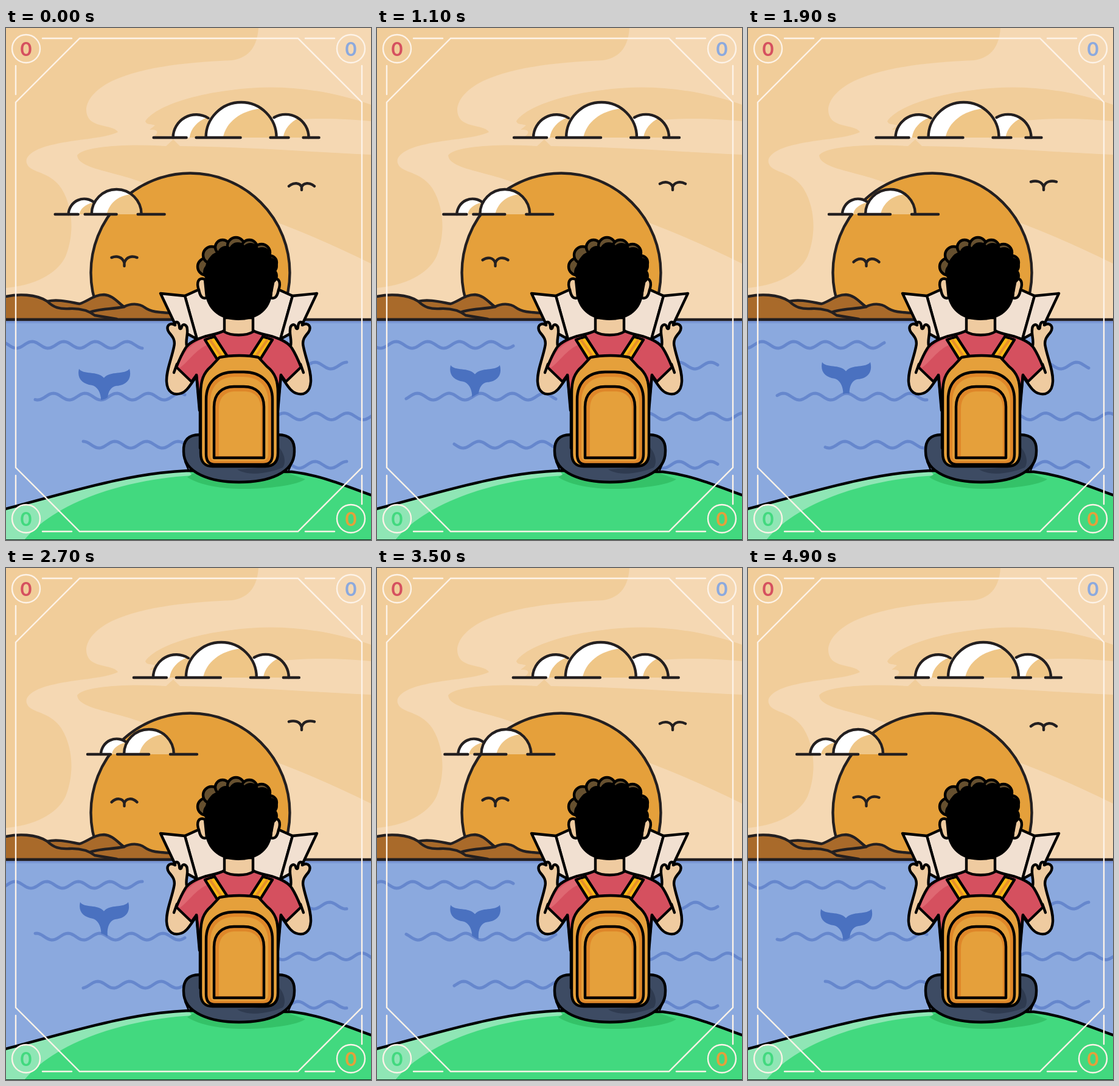
Animation, 600 px wide and 841 px high, one loop 5 s. Source, as an HTML page:

```html
<!DOCTYPE html>
<html lang="en">
<head>
<meta charset="utf-8">
<title>Sunset by the sea</title>
<style>
html, body { margin: 0; width: 100%; height: 100%; overflow: hidden; }
svg { display: block; width: 100vw; height: 100vh; }
text { font: 600 31px Inter, Roboto, sans-serif; text-anchor: middle; }
.ink { stroke: #231f20; stroke-width: 4.4; stroke-linecap: round; stroke-linejoin: round; }
.pen { stroke: #000; stroke-width: 4.4; stroke-linecap: round; stroke-linejoin: round; }
.no { fill: none; }
.tan { fill: #efc687; }
.skin { fill: #efcba0; }
</style>
</head>
<body>
<svg viewBox="0 0 600 841" preserveAspectRatio="none">
  <defs><clipPath id="above"><path id="cut"/></clipPath></defs>

  <!-- sky -->
  <path fill="#f1cd9a" d="M0 0H600V480H0Z"/>
  <path fill="#f5d8b3" d="M415 0C413 28 402 48 372 53C300 56 215 64 165 92C135 110 124 134 138 151C150 163 178 160 184 171C160 182 112 183 80 191C50 197 30 209 34 222C40 240 72 233 92 265C111 297 112 340 98 375C84 405 45 423 0 427V480H600V0Z"/>
  <g fill="#f1cd9a">
    <path d="M600 126C520 98 440 92 370 102C310 109 246 128 229 153C231 160 240 157 245 160L236 167C250 166 252 172 243 178C320 178 420 148 520 149C550 149 575 151 600 153Z"/>
    <path d="M600 208C500 204 400 195 286 194L275 183L263 194C200 190 128 194 117 209C118 232 180 235 230 256C320 290 390 300 450 321C500 340 550 362 600 387Z"/>
  </g>
  <circle class="ink" cx="303" cy="402" r="163.5" fill="#e5a03b"/>

  <!-- clouds -->
  <g id="cloudA">
    <g fill="#fff">
      <path d="M275 180A38 38 0 0 1 351 180Z"/>
      <path class="tan" d="M302 180C304 165 315 153 331 147L351 180Z"/>
      <path class="ink no" d="M275 180A38 38 0 0 1 333 148"/>
      <path d="M422 180A38 38 0 0 1 498 180Z"/>
      <path class="tan" d="M456 180C458 165 468 155 481 148A38 38 0 0 1 498 180Z"/>
      <path class="ink no" d="M441 147A38 38 0 0 1 498 180"/>
      <path d="M329 180A58 58 0 0 1 445 180Z"/>
      <path class="tan" d="M357 180C362 155 385 136 420 132A58 58 0 0 1 445 180Z"/>
    </g>
    <path class="ink no" d="M329 180A58 58 0 0 1 445 180M243 180H297M313 180H386M435 180H465M489 180H515"/>
  </g>
  <g id="cloudB">
    <g fill="#fff">
      <path d="M102 306A26 26 0 0 1 154 306Z"/>
      <path class="tan" d="M120 306C121 297 129 290 144 286L154 306Z"/>
      <path class="ink no" d="M102 306A26 26 0 0 1 145 287"/>
      <path d="M140 306A41 41 0 0 1 222 306Z"/>
      <path class="tan" d="M165 306C168 290 182 275 206 273A41 41 0 0 1 222 306Z"/>
    </g>
    <path class="ink no" d="M140 306A41 41 0 0 1 222 306M80 306H118M129 306H181M216 306H260"/>
  </g>
  <path id="birdA" class="ink no"/>
  <path id="birdB" class="ink no"/>

  <!-- hills and sea -->
  <g class="ink" fill="#a96a2a">
    <path d="M-5 442C20 436 50 437 68 449C85 445 104 450 121 453C136 448 145 438 161 438C176 439 184 451 194 458C205 452 218 452 228 459C240 468 255 467 290 469V479H-5Z"/>
    <path class="no" d="M68 449C78 459 88 462 104 461C125 460 138 466 146 472M194 458C175 462 150 461 138 467M146 472L182 478"/>
  </g>
  <path fill="#8ba9de" d="M0 479H600V841H0Z"/>
  <path fill="#7b98d6" d="M0 481H600V485H0Z"/>
  <path class="ink" d="M-5 479H605"/>
  <g id="waves" fill="none" stroke="#6687cd" stroke-width="5" stroke-linecap="round"/>
  <g clip-path="url(#above)">
    <path id="tail" fill="#4a71c0" d="M120 560C126 570 151 563 161 575C171 563 196 570 203 560C208 578 196 587 182 588C172 589 168 598 167 608V640H156V608C155 598 150 589 141 587C126 585 116 576 120 560Z"/>
  </g>

  <!-- ground -->
  <path fill="#42d97f" d="M-5 791C100 764 200 731 300 727L470 729C520 735 560 753 605 769V841H-5Z"/>
  <path fill="#8fe6b5" d="M-5 791C100 764 200 731 300 727L306 735C190 742 80 780 30 841H-5Z"/>
  <path fill="#34c268" d="M298 738C320 752 360 758 400 757C440 756 480 750 492 741L460 730H310Z"/>
  <path class="pen no" d="M-5 791C100 764 200 731 300 727L470 729C520 735 560 753 605 769"/>
  <path fill="#12301f" d="M0 840H600V841H0Z"/>

  <!-- traveller -->
  <g class="pen">
    <g id="side">
      <path fill="#f1e0d1" d="M294 440L334 422L384 430V520H316Z"/>
      <path fill="#f1e0d1" d="M254 436L294 440L314 511L281 493Z"/>
      <path class="skin" d="M297 522C295 512 299 505 298 496C298 487 291 485 289 490C288 496 285 495 285 490C284 481 277 481 278 488C268 482 262 491 268 500C274 507 279 513 276 524C272 544 263 563 264 581C265 599 276 604 288 600C298 597 304 584 312 574Z"/>
      <path class="skin" d="M327 413C315 408 313 420 317 430C319 441 323 446 330 443Z"/>
    </g>
    <use href="#side" transform="matrix(-1 0 0 1 765 0)"/>
    <path fill="#3d4b63" d="M318 668C300 668 291 677 292 696C292 732 338 746 383 746C430 746 474 732 474 696C475 677 466 668 447 668Z"/>
    <path class="no" stroke-width="2.5" d="M294 712L300 726M471 712L465 726"/>
    <path fill="#2f3b50" stroke="none" d="M448 688C455 715 440 722 380 725C400 738 436 730 455 722C462 712 456 696 448 688Z"/>
    <path fill="#d5505f" d="M359 497C348 503 336 504 326 507C311 512 301 517 295 526C288 537 284 547 280 557L305 581L313 570L319 628V690H446V628L452 570L460 581L485 557C481 547 477 537 470 526C464 517 454 512 439 507C429 504 417 503 406 497Z"/>
    <path fill="#df6872" stroke="none" d="M284 556C289 538 300 520 326 510L332 520C312 528 300 548 286 558Z"/>
    <path class="no" d="M281 552L276 566M484 552L489 566M313 570L318 628M452 570L447 628"/>
    <path class="skin" d="M359 476V499C370 506 395 506 406 499V476Z"/>
    <g id="strap">
      <path fill="#fbb817" d="M327 512L343 507L365 541L347 544Z"/>
      <path fill="none" stroke="#e8912a" stroke-width="4" d="M336 513L354 539"/>
    </g>
    <use href="#strap" transform="matrix(-1 0 0 1 765 0)"/>
    <path fill="#e5a03b" d="M351 541C370 537 398 537 415 541L429 556C443 567 447 580 447 600V698C447 713 440 720 426 720H340C326 720 320 713 320 698V600C320 580 324 567 337 556Z"/>
    <path fill="#df8729" d="M329 700V610C329 581 348 565 375 565H391C418 565 438 581 438 610V700C438 714 431 717 423 717H343C335 717 329 713 329 700Z"/>
    <path fill="#e5a03b" stroke="none" d="M336 702V613C336 588 352 573 376 573H390C415 573 431 588 431 613V702Q430 711 421 711H345Q336 711 336 702Z"/>
    <path fill="#df8729" d="M342 706V622C342 601 355 589 375 589H391C411 589 424 601 424 622V706Z"/>
    <path fill="#e5a03b" stroke="none" d="M350 703V626C350 607 360 597 377 597H391C409 597 419 607 419 626V703Z"/>
    <g id="curls" fill="#66502f"></g>
    <g id="hair" stroke="none"></g>
    <path stroke="none" d="M327 400C327 373 350 360 384 360C420 360 446 375 444 405C441 420 438 435 437 440C432 467 410 480 382 480C354 480 333 466 328 440Z"/>
  </g>

  <!-- border -->
  <g fill="none" stroke="#fdf3e8" stroke-width="2.4" stroke-linecap="round">
    <path d="M121 17H480L585 122V722L480 827H121L16 722V122Z"/>
    <path d="M60 17H108M492 17H540M60 827H108M492 827H540M16 62V109M585 62V109M16 735V782M585 735V782"/>
    <circle cx="33" cy="34" r="23"/><circle cx="567" cy="34" r="23"/>
    <circle cx="33" cy="806" r="23"/><circle cx="567" cy="806" r="23"/>
  </g>
  <text x="33" y="46" fill="#d5505f">0</text>
  <text x="567" y="46" fill="#8ba9de">0</text>
  <text x="33" y="818" fill="#42d97f">0</text>
  <text x="567" y="818" fill="#e5a03b">0</text>
</svg>
<script>
const $ = id => document.getElementById(id);
const set = (id, name, value) => $(id).setAttribute(name, value);
const LOOP = 5000, PEAK = 2330, PERIOD = 52, AMP = 5.5;

const discs = list => list.map(([x, y, r]) => `<circle cx="${x}" cy="${y}" r="${r}"/>`).join("");
$("curls").innerHTML = discs([[329, 392, 14], [338, 373, 14], [356, 360, 12], [378, 358, 14], [400, 361, 13], [420, 369, 14], [434, 385, 11]]);
$("hair").innerHTML = discs([[339, 401, 15], [348, 383, 14], [361, 371, 13], [381, 367, 15], [402, 367, 14], [421, 375, 15], [433, 391, 14], [434, 407, 13]]);

// from x, to x, middle y, x of one trough at rest
const waves = [
  [-10, 225, 520.5, 225], [48, 294, 605.5, 52], [127, 330, 684.5, 153],
  [440, 560, 554.5, 534], [430, 610, 638, 483], [440, 560, 717.5, 534]
];
const lines = waves.map(() => $("waves").appendChild(
  document.createElementNS("http://www.w3.org/2000/svg", "path")));

function wave([from, to, mid, trough], shift) {
  const pts = [];
  for (let x = from; x <= to; x += 3) {
    const y = mid + AMP * Math.cos((x - trough + shift) / PERIOD * 2 * Math.PI);
    pts.push(x + " " + y.toFixed(2));
  }
  return "M" + pts.join("L");
}

// wing: height of the wing tips, arch: height of the curve's handles
const bird = (x, y, wing, arch) =>
  `M${x - 21} ${wing}C${x - 13} ${arch} ${x - 3} ${arch + 1} ${x} ${y - 5}V${y}` +
  `M${x} ${y - 5}C${x + 3} ${arch + 1} ${x + 13} ${arch} ${x + 21} ${wing}`;

function draw(now) {
  const t = now % LOOP;
  const u = (1 + Math.cos((t - PEAK) / LOOP * 2 * Math.PI)) / 2;
  set("cloudA", "transform", `translate(${-35 * u} 0)`);
  set("cloudB", "transform", `translate(${57 * u} 0)`);
  set("birdA", "d", bird(486, 266, 260 - 8 * u, 253 - 3 * u));
  set("birdB", "d", bird(194.5, 391, 377 + 8 * u, 374 + 3 * u));
  // the sea runs left by one wavelength per loop
  const shift = PERIOD * t / LOOP;
  waves.forEach((w, i) => lines[i].setAttribute("d", wave(w, shift)));
  set("cut", "d", wave([100, 220, 605.5, 52], shift) + "V500H100Z");
  const s = 1 - 0.05 * u;
  set("tail", "transform", `translate(${161 * (1 - s)} ${-12 * u}) scale(${s} 1)`);
}

const start = performance.now();
function tick() {
  draw(performance.now() - start);
  requestAnimationFrame(tick);
}
tick();
</script>
</body>
</html>
```
